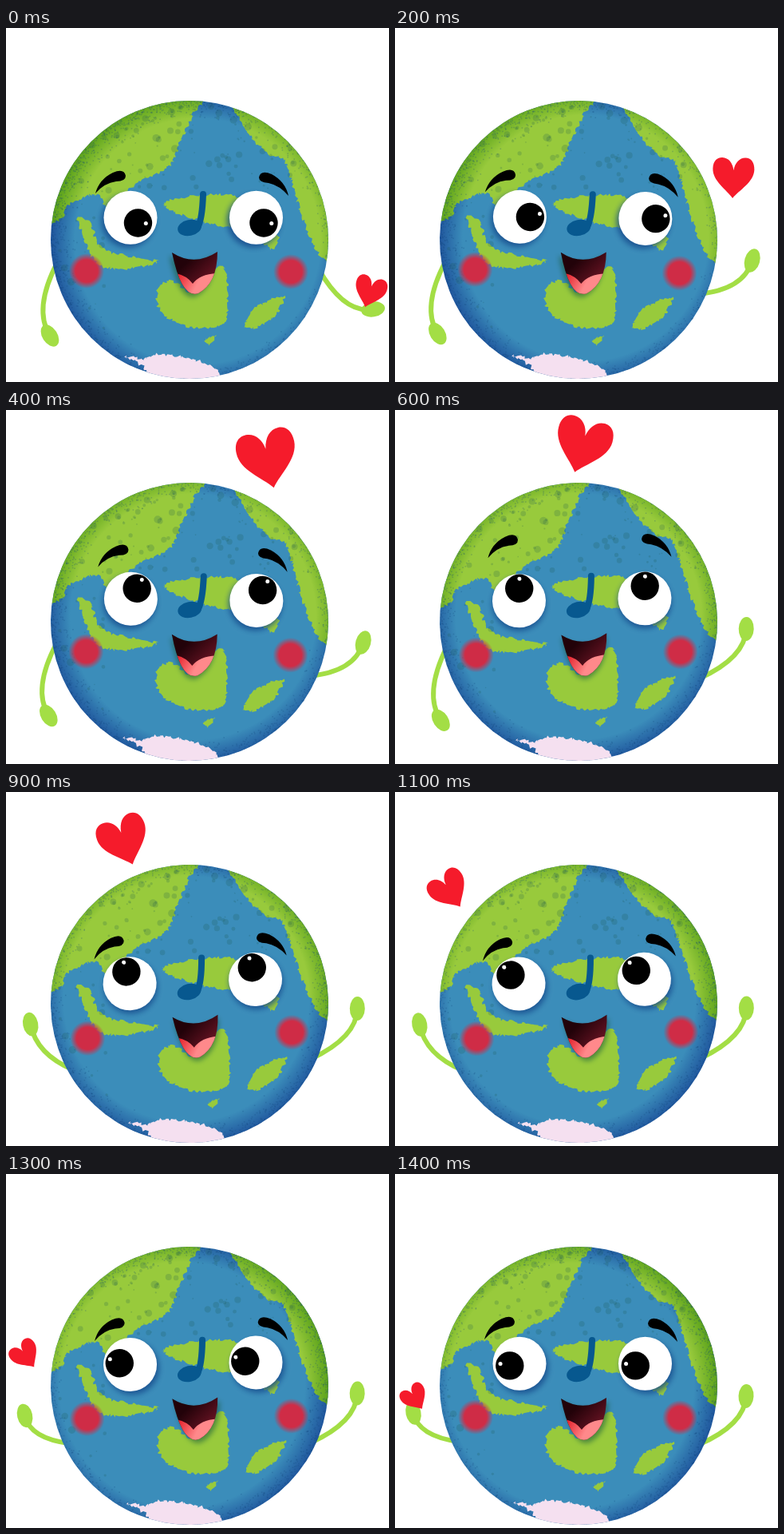
An HTML page with a canvas for the animation above (1.6 s loop, 480x443 px).

```html
<!DOCTYPE html>
<html lang="en">
<head>
<meta charset="utf-8">
<title>Happy planet</title>
<style>
html, body { margin: 0; width: 100%; height: 100%; overflow: hidden; background: #fff; }
canvas { display: block; }
</style>
</head>
<body>
<canvas id="stage" width="480" height="443"></canvas>
<script>
const ctx = document.getElementById('stage').getContext('2d');
const LOOP = 1600, CX = 230, CY = 265, R = 174, TAU = Math.PI * 2;
const rad = deg => deg * Math.PI / 180;

function seeded(seed) {
  return () => {
    seed = (seed * 1664525 + 1013904223) >>> 0;
    return seed / 4294967296;
  };
}
const rnd = seeded(42);

// Catmull-Rom curve from b to c
const spline = (a, b, c, d, u) =>
  b + u / 2 * (c - a + u * (2 * a - 5 * b + 4 * c - d + u * (3 * (b - c) + d - a)));

// Smooth closed outline through a few points, with a chalky edge
function chalk(text, amount = 2) {
  const pts = text.split(' ').map(p => p.split(',').map(Number));
  const n = pts.length, path = new Path2D();
  const jitter = () => (rnd() - .5) * 2 * amount;
  for (let i = 0; i < n; i++) {
    const [a, b, c, d] = [n - 1, 0, 1, 2].map(k => pts[(i + k) % n]);
    const steps = Math.ceil(Math.hypot(c[0] - b[0], c[1] - b[1]) / 2);
    for (let k = 0; k < steps; k++) {
      const [x, y] = [0, 1].map(j => spline(a[j], b[j], c[j], d[j], k / steps));
      path.lineTo(x + jitter(), y + jitter());
    }
  }
  path.closePath();
  return path;
}

const lands = [
  '237,80 234,108 218,143 203,174 160,196 130,226 112,208 78,222 70,238 40,236 60,80',
  '90,237 106,246 120,276 160,286 190,293 150,301 118,297 102,274',
  '198,222 235,210 290,212 290,246 245,242',
  '320,266 341,261 335,277',
  '190,326 208,317 236,331 262,301 274,302 278,341 270,372 225,373 194,354',
  '300,374 312,351 348,336 336,360 314,374',
  '249,390 263,385 255,396',
  '294,85 297,123 328,156 350,168 366,220 384,268 402,292 440,290 420,85'
].map(p => chalk(p));
const ice = chalk('150,411 172,414 190,408 235,415 268,431 270,455 195,455 172,424');

const leftBrow = new Path2D('M112 207Q117 189 134 181Q148 175 150 185Q150 192 138 192Q123 194 112 207Z');
const rightBrow = new Path2D('M354 210Q350 192 333 183Q319 177 317 187Q317 193 329 194Q343 197 354 210Z');
const mouth = new Path2D('M208 281Q236 299 265 280Q265 319 241 332Q220 339 208 281Z');
const tongue = new Path2D('M213 307Q227 310 234 320Q243 308 264 307L250 340L222 340Z');
const heart = new Path2D('M0 .5C-.15 .3 -.5 .1 -.5 -.2C-.5 -.4 -.39 -.47 -.28 -.47C-.13 -.47 -.02 -.34 0 -.17C.03 -.36 .14 -.48 .28 -.48C.41 -.48 .5 -.38 .5 -.2C.5 .1 .15 .3 0 .5Z');

// Spots cover the top and the left side
const spots = [];
while (spots.length < 130) {
  const x = CX + (rnd() - .5) * 2 * R, y = CY + (rnd() - .5) * 2 * R;
  const top = y < 205, left = x < 125 && rnd() < .3;
  if (Math.hypot(x - CX, y - CY) < R - 3 && (top || left)) spots.push([x, y, .8 + rnd() ** 2 * 4]);
}
const grains = Array.from({ length: 3200 }, () => {
  const a = rnd() * TAU, d = R - rnd() * rnd() * 42;
  return [Math.cos(a) * d, Math.sin(a) * d, 150 + rnd() * 38];
});

// Each arm: shoulder, elbow, hand
const arms = {
  down: [[64, 294], [34, 352], [55, 385]],
  leftUp: [[82, 343], [36, 322], [30, 284]],
  reach: [[80, 335], [29, 328], [23, 299]],
  offer: [[392, 302], [424, 358], [460, 352]],
  thrown: [[380, 331], [438, 325], [448, 288]],
  rightUp: [[380, 339], [438, 314], [440, 278]]
};
const between = (a, b) => a.map((p, i) => p.map((v, j) => (v + b[i][j]) / 2));
const toss = between(arms.offer, arms.thrown);
const rightArm = t => t < 100 ? arms.offer : t < 200 ? toss : t < 600 ? arms.thrown : arms.rightUp;
const leftArm = t => t < 900 ? arms.down : t < 1200 ? arms.leftUp : arms.reach;

// Time, heart x, y, size and tilt, gaze angle, planet tilt
const keys = [
  [0, 456, 330, 40, 17, 35, 0],
  [200, 424, 187, 52, 2, 0, .8],
  [400, 328, 61, 74, -12, -60, .8],
  [600, 235, 44, 70, 16, -88, -1.1],
  [900, 148, 61, 63, -20, -104, -1.9],
  [1200, 38, 161, 42, -37, -146, -1.9],
  [1400, 25, 280, 33, -33, -192, 0]
];
const steps = [0, 100, 200, 300, 400, 600, 900, 1100, 1200, 1300, 1400];

function sample(t) {
  const i = keys.findLastIndex(k => k[0] <= t);
  const [a, b, c, d] = [-1, 0, 1, 2].map(k => keys[Math.min(keys.length - 1, Math.max(0, i + k))]);
  const u = (t - b[0]) / (c[0] - b[0] || 1);
  return b.map((v, j) => spline(a[j], v, c[j], d[j], u));
}

function disc(x, y, r, color) {
  ctx.fillStyle = color;
  ctx.beginPath();
  ctx.arc(x, y, r, 0, TAU);
  ctx.fill();
}

function drawArm([[sx, sy], [ex, ey], [hx, hy]]) {
  ctx.strokeStyle = ctx.fillStyle = '#a3de45';
  ctx.lineWidth = 6;
  ctx.beginPath();
  ctx.moveTo(sx, sy);
  ctx.quadraticCurveTo(ex, ey, hx, hy);
  ctx.stroke();
  ctx.beginPath();
  ctx.ellipse(hx, hy, 15, 9.5, Math.atan2(hy - ey, hx - ex), 0, TAU);
  ctx.fill();
}

function shade([x, y], inner, outer) {
  const g = ctx.createRadialGradient(CX + x, CY + y, 154, CX + x, CY + y, 186);
  g.addColorStop(0, inner);
  g.addColorStop(1, outer);
  return g;
}

function softShadow([x], blur, color) {
  ctx.shadowColor = color;
  ctx.shadowBlur = blur;
  ctx.shadowOffsetX = -x * .3;
  ctx.shadowOffsetY = 4;
}

function drawGlobe(light) {
  ctx.save();
  ctx.beginPath();
  ctx.arc(CX, CY, R, 0, TAU);
  ctx.clip();
  ctx.fillStyle = shade(light, '#3b8dba', '#1d519b');
  ctx.fillRect(CX - R, CY - R, R * 2, R * 2);
  ctx.fillStyle = shade(light, '#98ca3c', '#569f18');
  lands.forEach(p => ctx.fill(p));
  for (const [x, y, r] of spots) disc(x, y, r, 'rgba(25,85,75,.2)');
  ctx.fillStyle = 'rgba(18,70,125,.25)';
  for (const [x, y, limit] of grains) {
    if (Math.hypot(x - light[0], y - light[1]) > limit) ctx.fillRect(CX + x, CY + y, 1.5, 1.5);
  }
  ctx.fillStyle = '#f5e0f0';
  ctx.fill(ice);
  ctx.restore();
}

function drawCheek(x, y) {
  const g = ctx.createRadialGradient(x, y, 14, x, y, 22);
  g.addColorStop(0, 'rgba(207,44,70,1)');
  g.addColorStop(1, 'rgba(207,44,70,0)');
  disc(x, y, 22, g);
}

function drawEye(x, y, gaze, light) {
  const c = Math.cos(gaze), s = Math.sin(gaze), reach = 13 - 2.5 * s;
  const px = x + c * reach, py = y + s * reach;
  ctx.save();
  softShadow(light, 7, 'rgba(22,75,140,.85)');
  disc(x, y, 33.5, '#fff');
  ctx.restore();
  disc(px, py, 17.7, '#000');
  disc(px + c * 12, py + s * 8 - 4, 2.5, '#fff');
}

function drawNose() {
  ctx.strokeStyle = ctx.fillStyle = '#07588f';
  ctx.lineWidth = 8;
  ctx.lineCap = 'round';
  ctx.beginPath();
  ctx.moveTo(247, 208);
  ctx.quadraticCurveTo(246, 240, 240, 250);
  ctx.stroke();
  ctx.lineCap = 'butt';
  ctx.beginPath();
  ctx.ellipse(230, 250, 15, 10, -.2, 0, TAU);
  ctx.fill();
}

function drawBrow(path, x, y) {
  ctx.save();
  ctx.translate(x, y);
  ctx.fillStyle = '#000';
  ctx.fill(path);
  ctx.restore();
}

function blend(x0, y0, x1, y1, from, to) {
  const g = ctx.createLinearGradient(x0, y0, x1, y1);
  g.addColorStop(0, from);
  g.addColorStop(1, to);
  return g;
}

function drawMouth(light) {
  ctx.save();
  softShadow(light, 6, 'rgba(25,90,60,.6)');
  ctx.fillStyle = blend(230, 290, 256, 318, '#220209', '#6a1424');
  ctx.fill(mouth);
  ctx.restore();
  ctx.save();
  ctx.clip(mouth);
  ctx.fillStyle = blend(216, 308, 240, 320, '#e5222c', '#ff898b');
  ctx.fill(tongue);
  ctx.restore();
}

function drawHeart(x, y, size, tilt) {
  ctx.save();
  ctx.translate(x, y);
  ctx.rotate(rad(tilt));
  ctx.scale(size, size);
  ctx.fillStyle = '#f51b2b';
  ctx.fill(heart);
  ctx.restore();
}

function draw(t) {
  const [, x, y, size, tilt, look, lean] = sample(t);
  const gaze = rad(look);
  const light = [(x - CX) * .045, (y - CY) * .03];
  const lift = Math.max(0, 24 - Math.abs(t - 600) * .075);
  ctx.fillStyle = '#fff';
  ctx.fillRect(0, 0, 480, 443);
  ctx.save();
  ctx.translate(CX, CY);
  ctx.rotate(rad(lean));
  ctx.translate(-CX, -CY);
  drawArm(leftArm(t));
  drawArm(rightArm(t));
  drawGlobe(light);
  drawCheek(101, 304);
  drawCheek(357, 305);
  drawEye(156, 237.3, gaze, light);
  drawEye(313.5, 237.3, gaze, light);
  drawNose();
  drawMouth(light);
  drawBrow(leftBrow, lift / 4, -lift);
  drawBrow(rightBrow, -lift / 4, -lift);
  ctx.restore();
  drawHeart(x, y, size, tilt);
}

const start = performance.now();
let shown;
function tick() {
  const t = (performance.now() - start) % LOOP;
  const step = steps.findLast(s => s <= t);
  if (step !== shown) draw(shown = step);
  requestAnimationFrame(tick);
}
tick();
</script>
</body>
</html>
```
